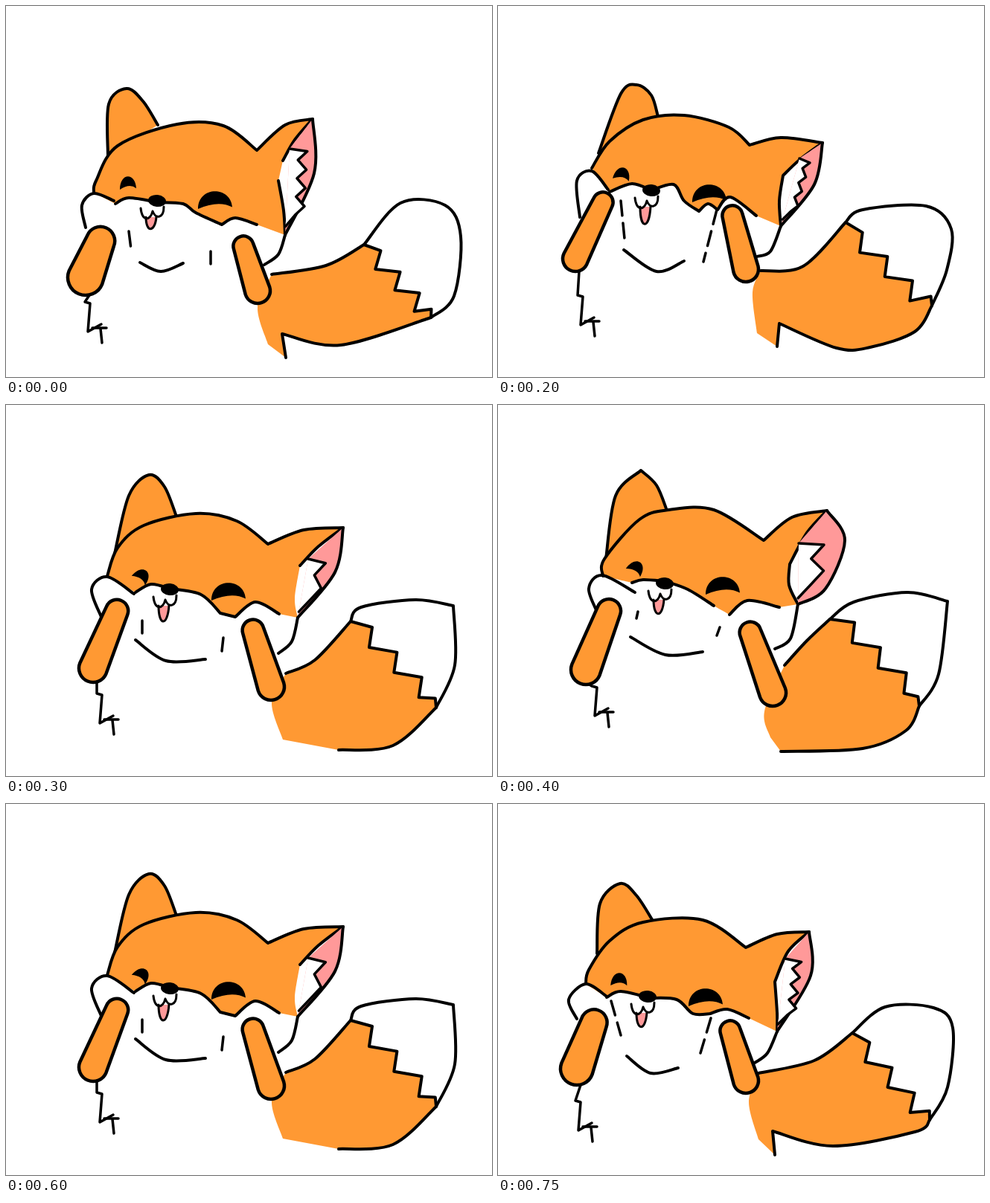
Recreate the animation shown at these times as an HTML page with a canvas. Size 653 by 499 pixels, loop 800 ms.

```html
<!DOCTYPE html>
<html lang="en">
<head>
<meta charset="utf-8">
<title>Fox squishing its cheeks</title>
<style>
html, body { margin: 0; width: 100%; height: 100%; overflow: hidden; background: #fff; }
canvas { display: block; }
</style>
</head>
<body>
<canvas id="stage" width="653" height="499"></canvas>
<script>
const ctx = document.getElementById("stage").getContext("2d");
const ORANGE = "#ff9933", PINK = "#ff9999", BLACK = "#000", WHITE = "#fff";
const STEP = 50;

// Outlines are smooth curves through a few points. "|" is a corner,
// "~" starts a piece without a line, "z" one with a zigzag of given lean.
const low = {
  under: "376 473 371 441|450 456 571 419", over: "0 481 321 430 349 357 361",
  flank: "338 405 352 455", tip: "602 390 611 310 590 268 530 265",
  farEar: "137 203 138 132 162 111 184 128 204 160",
  head: "337 294 308 285 290 294|255 278 238 266 204 264|165 258 147 266|~ 118 251|121 235 150 188 230 159 292 161 337 194|375 160 412 152|388 180 372 208|~ 366 235|373 275",
  ear: "381 192|~ 412 152|414 225 375 308", tuft: [4, 24],
  jaw: "366 334 347 348", cheek: "107 298 102 268 118 252 145 262",
  chest: "180 345 208 357 238 346", creases: "165 303 168 327/275 330 275 347",
  fur: [110, 438], nose: [203, 262, 38], eyes: [164, 238, 0, 281, 261],
  paws: [[127, 316, 107, 365, 24], [319, 323, 338, 383, 17]]
};

const left = {
  under: "372 471 369 439|450 459 560 440 580 424", over: "-2 476 307 425 344 350 361",
  flank: "337 400 350 450", tip: "604 380 611 300 585 273 520 272",
  farEar: "133 200 137 133 164 106 186 122 208 156",
  head: "337 287 308 275 285 281|262 281 240 262 204 260|165 251 146 259|~ 118 241|122 222 150 183 195 158 275 155 333 192|375 174 418 171|390 197 372 238|375 280",
  ear: "386 207|~ 418 171|420 230 375 305", tuft: [4, 22],
  jaw: "362 334 345 347", cheek: "106 288 95 262 118 241 145 257",
  chest: "173 338 205 361 242 354", creases: "152 264 165 310/286 287 272 334",
  fur: [108, 438], nose: [201, 258, 42], eyes: [163, 235, 5, 279, 259],
  paws: [[129, 293, 106, 355, 22], [312, 304, 333, 371, 17]]
};

const stretched = {
  under: "375 458 378 427|455 460 500 459 560 438 583 403", over: "-5 467 291 410 350 353 356",
  flank: "342 385 348 440", tip: "603 355 609 300 575 269 490 274",
  farEar: "135 198 165 118 186 106 206 120 215 149",
  head: "347 282 312 257 295 274|282 266 270 276|250 262 236 240 206 248|180 239 150 250|~ 126 218|150 182 195 153 250 147 310 163 338 187|380 177 436 184|405 207 383 228|378 262",
  ear: "405 205|~ 436 184|425 240 380 296", tuft: [4, 15],
  jaw: "366 330 348 337", cheek: "110 284 106 235 126 222 148 247",
  chest: "169 328 213 357 250 343", creases: "165 262 170 313/294 274 276 344",
  fur: [111, 429], nose: [206, 248, 48], eyes: [167, 226, 15, 284, 252],
  paws: [[141, 264, 104, 340, 17], [315, 282, 333, 354, 17]]
};

const right = {
  under: "447 464 520 458 578 407", over: "4 463 291 415 343 376 361",
  flank: "357 400 372 450", tip: "603 350 601 270|550 262 477 272",
  farEar: "146 200 165 122 192 94 213 110 229 150",
  head: "367 281 335 265 308 285|288 280|262 255 220 247|195 241 174 252|~ 136 230|150 192 185 162 255 146 310 156 352 187|400 168 453 165|420 190 395 216|~ 388 260",
  ear: "406 207|~ 453 165|442 225 392 286", tuft: [2, 24],
  jaw: "384 318 366 334", cheek: "128 285 115 248 136 231 172 254",
  chest: "174 316 215 344 268 342", creases: "183 290 183 307/292 313 290 331",
  fur: [126, 428], nose: [220, 248, 45], eyes: [183, 230, 40, 299, 251],
  paws: [[149, 277, 117, 354, 19], [332, 303, 356, 379, 18]]
};

const high = {
  under: "380 464 490 460 548 436 566 403", over: "9 446 286 415 315 385 348",
  flank: "358 410 366 445", tip: "592 360 604 262|550 250 478 263",
  farEar: "145 205 158 120 192 86|213 106 227 140",
  head: "378 270 335 261 311 280|~ 290 268|255 246 224 235|195 233 180 237|~ 141 228|143 205 190 152 230 139 290 139 357 180|395 149 442 140|415 170 392 212|391 240",
  ear: "404 184|~ 442 140|466 180 440 245 403 266", tuft: [2, 34],
  jaw: "393 312 372 326", cheek: "134 278 122 245 140 227 184 250",
  chest: "178 310 225 334 275 330", creases: "188 276 186 285/298 297 294 308",
  fur: [130, 416], nose: [224, 238, 42], eyes: [186, 217, 35, 302, 241],
  paws: [[149, 275, 118, 354, 20], [339, 304, 369, 385, 18]]
};

const POSES = [low, left, stretched, right, high];
// The drawings swing out and back; the whole fox bobs a little on top.
const ORDER = [..."0011223344433221"].map(Number);
const BOB = [0, 2, 0, -1, 0, -3, 0, -2, 2, -1, 0, -2, 0, -3, 0, 1];

const numbers = text => text.match(/-?\d+/g).map(Number);
const firstPoint = text => numbers(text).slice(0, 2);
const lastPoint = text => numbers(text).slice(-2);

function pairs(flat) {
  return flat.flatMap((x, i) => i % 2 ? [] : [[x, flat[i + 1]]]);
}

// Point at fraction t from a to b, moved sideways by off.
function beside([ax, ay], [bx, by], t, off) {
  const dx = bx - ax, dy = by - ay, size = Math.hypot(dx, dy);
  return [ax + dx * t + dy / size * off, ay + dy * t - dx / size * off];
}

function tailZigzag(from, to, lean) {
  const points = [beside(from, to, 0.06, -8)];
  for (let t = 0.16; t < 0.8; t += 0.29) {
    points.push(beside(from, to, t, 11 - lean), beside(from, to, t + 0.1, -11 - lean));
  }
  return [...points, to];
}

function trace(shape) {
  const area = new Path2D(), line = new Path2D();
  let last = null;
  for (const piece of shape.split("|")) {
    const flat = numbers(piece), zigzag = piece.startsWith("z");
    const lean = zigzag ? flat.shift() : 0;
    const points = pairs(flat);
    const paths = piece.startsWith("~") ? [area] : [area, line];
    if (last) line.moveTo(...last);
    else paths.forEach(path => path.moveTo(...points[0]));
    if (zigzag) {
      for (const p of tailZigzag(last, points[0], lean)) paths.forEach(path => path.lineTo(...p));
    } else if (last) points.unshift(last);
    const at = i => points[Math.max(0, Math.min(points.length - 1, i))];
    for (let i = 0; i < points.length - 1; i++) {
      const [a, b, c, d] = [at(i - 1), at(i), at(i + 1), at(i + 2)];
      const curve = [
        b[0] + (c[0] - a[0]) / 6, b[1] + (c[1] - a[1]) / 6,
        c[0] - (d[0] - b[0]) / 6, c[1] - (d[1] - b[1]) / 6, ...c
      ];
      paths.forEach(path => path.bezierCurveTo(...curve));
    }
    last = at(points.length - 1);
  }
  return { area, line };
}

function paint(area, fill, width, line = area) {
  if (fill) {
    ctx.fillStyle = fill;
    ctx.fill(area);
  }
  ctx.lineWidth = width;
  ctx.stroke(line);
}

function curve(shape, fill, width = 4) {
  const { area, line } = trace(shape);
  paint(area, fill, width, line);
}

function polyline(points, fill, width = 3.5) {
  const path = new Path2D();
  points.forEach(p => path.lineTo(...p));
  paint(path, fill, width);
}

function drawTuft(ear, [teeth, size]) {
  const top = firstPoint(ear), bottom = lastPoint(ear), points = [top];
  for (let i = 0; i < teeth; i++) {
    const t = i / teeth * 0.85;
    points.push(beside(top, bottom, t + 0.02, size), beside(top, bottom, t + 0.5 / teeth, size * 0.5));
  }
  polyline([...points, beside(top, bottom, 0.9, 0)], WHITE);
}

function drawFur([x, y], [, , pawX, pawY, r]) {
  polyline([[pawX + 5, pawY + r], [x - 4, y - 40], [x + 3, y - 38], [x, y], [x + 18, y - 10]]);
  polyline([[x + 6, y - 5], [x + 25, y - 5]]);
  polyline([[x + 17, y - 4], [x + 19, y + 15]]);
}

function drawPaw([ax, ay, bx, by, r]) {
  const angle = Math.atan2(by - ay, bx - ax), quarter = Math.PI / 2;
  const path = new Path2D();
  path.arc(ax, ay, r * 0.8, angle + quarter, angle + 3 * quarter);
  path.arc(bx, by, r, angle - quarter, angle + quarter);
  path.closePath();
  paint(path, ORANGE, 4.5);
}

function drawEye(x, y, w, h, degrees) {
  ctx.save();
  ctx.translate(x, y);
  ctx.rotate(degrees * Math.PI / 180);
  ctx.beginPath();
  ctx.moveTo(-w, h);
  ctx.bezierCurveTo(-w, -h * 1.6, w * 0.9, -h * 1.6, w, h * 0.8);
  ctx.quadraticCurveTo(w * 0.2, 0, -w, h);
  ctx.fillStyle = BLACK;
  ctx.fill();
  ctx.restore();
}

function drawMuzzle([x, y, tongueEnd]) {
  ctx.save();
  ctx.translate(x, y);
  paint(new Path2D(`M-15 22C-15 ${tongueEnd + 5} -3 ${tongueEnd + 5} -1 22`), PINK, 3);
  paint(new Path2D("M-22 10C-20 28 -9 27 -6 14C-2 25 9 24 9 8"), null, 3);
  ctx.beginPath();
  ctx.ellipse(0, 0, 12, 8, 0.1, 0, Math.PI * 2);
  ctx.fillStyle = BLACK;
  ctx.fill();
  ctx.restore();
}

function drawFox(pose) {
  const earEnd = lastPoint(pose.ear).join(" ");
  curve(`${pose.under}|z ${pose.over}|~ ${pose.flank}`, ORANGE);
  const root = numbers(pose.over).slice(1, 3).join(" ");
  curve(`${lastPoint(pose.under).join(" ")} ${pose.tip} ${root}`);
  curve(pose.farEar, ORANGE);
  curve(`${pose.head} ${earEnd}`, ORANGE);
  curve(pose.ear, PINK);
  drawTuft(pose.ear, pose.tuft);
  curve(`${earEnd} ${pose.jaw}`);
  curve(pose.cheek);
  curve(pose.chest);
  ctx.setLineDash([20, 10]);
  pose.creases.split("/").forEach(crease => curve(crease, null, 3.5));
  ctx.setLineDash([]);
  drawFur(pose.fur, pose.paws[0]);
  const [lx, ly, tilt, rx, ry] = pose.eyes;
  drawEye(lx, ly, 11, 9, tilt);
  drawEye(rx, ry, 23, 12, 0);
  drawMuzzle(pose.nose);
  pose.paws.forEach(drawPaw);
}

function draw(now) {
  const step = Math.floor(now / STEP) % ORDER.length;
  ctx.setTransform(1, 0, 0, 1, 0, 0);
  ctx.fillStyle = WHITE;
  ctx.fillRect(0, 0, 653, 499);
  ctx.translate(0, BOB[step]);
  ctx.strokeStyle = BLACK;
  ctx.lineCap = ctx.lineJoin = "round";
  drawFox(POSES[ORDER[step]]);
}

const start = performance.now();
function tick() {
  draw(performance.now() - start);
  requestAnimationFrame(tick);
}
tick();
</script>
</body>
</html>
```
